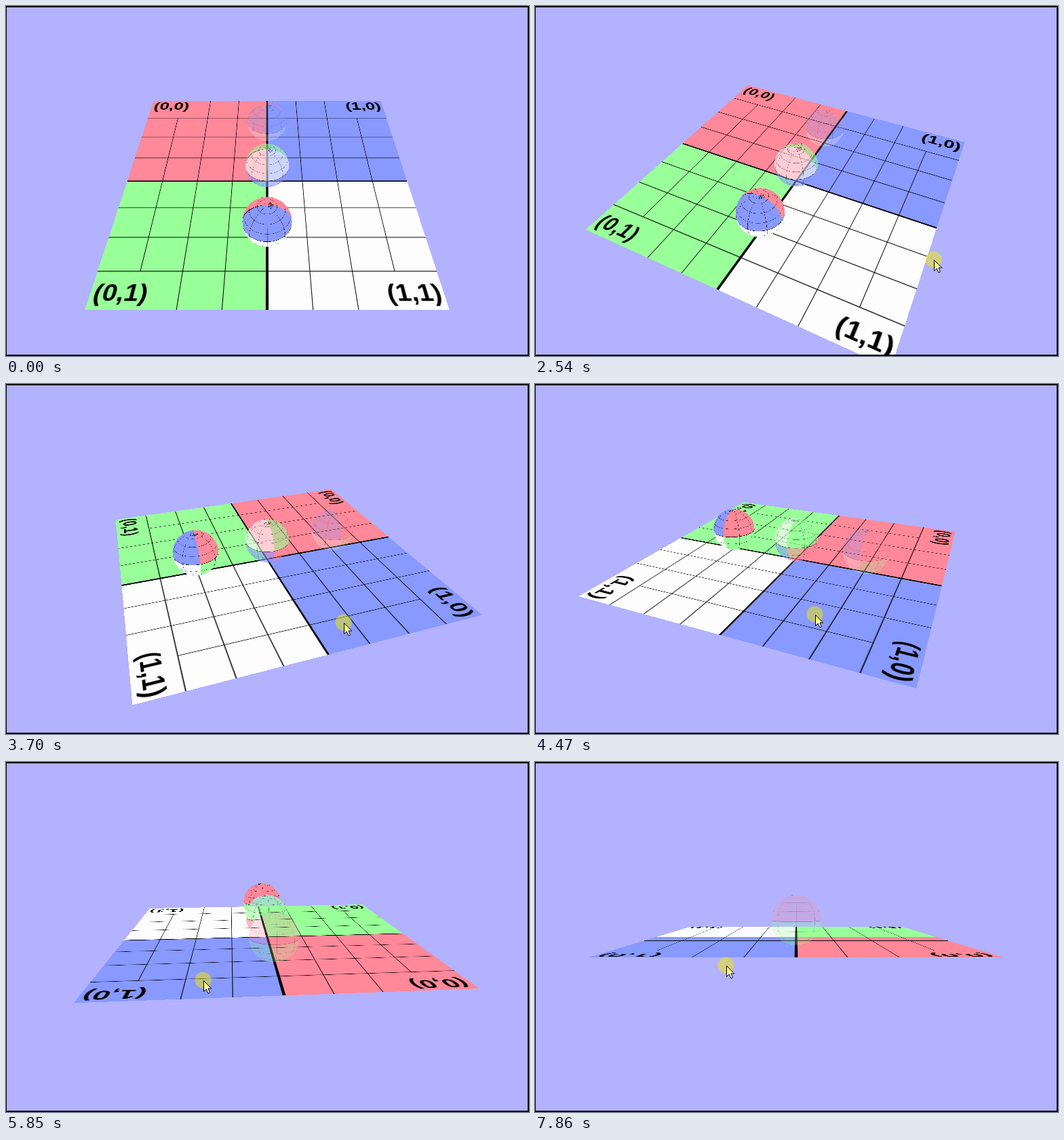
Recreate the animation shown at these times as an HTML page with a canvas. Size 771 by 516 pixels, loop 8000 ms.

```html
<!DOCTYPE html>
<html lang="en">
<head>
<meta charset="utf-8">
<title>Texture coordinates</title>
<style>
html, body { margin: 0; width: 100%; height: 100%; overflow: hidden; background: #b2b2ff; }
canvas { display: block; }
</style>
</head>
<body>
<canvas id="stage" width="771" height="516"></canvas>
<script>
const W = 771, H = 516, LOOP = 8000, RATE = 13 / 1000;
const CX = 385, CY = 258, FOCAL = 627, DIST = 3.04, RADIUS = 0.15;
const SIZE = 512, CELL = SIZE / 8, BACK = [178, 178, 255];
const ctx = document.getElementById('stage').getContext('2d');
const image = ctx.createImageData(W, H);
const pixels = image.data;
const texels = makeTexture();

// Spheres rest on the plane, from the far one to the near one.
const spheres = [
  { z: -0.5, alpha: 0.25, flip: false },
  { z: 0, alpha: 0.6, flip: true },
  { z: 0.5, alpha: 1, flip: false }
];

// Pointer path: time, x, y. Dragging turns the camera, which lags a little.
const PRESS = 1530, ENTER = 70, LAG = 20;
const path = [
  [70, 735, 505], [150, 710, 499], [240, 710, 499], [310, 680, 478], [460, 615, 415],
  [540, 588, 385], [690, 612, 362], [770, 624, 356], [930, 624, 356], [1150, 642, 380],
  [1775, 642, 380], [2000, 630, 379], [2540, 588, 374], [3390, 528, 365], [3700, 497, 352],
  [4240, 440, 343], [5080, 338, 330], [5230, 321, 327], [5500, 303, 324], [5930, 288, 322],
  [6080, 284.5, 320.5], [6230, 284.5, 320.5], [6390, 283, 319], [6780, 283, 319],
  [7550, 282, 303], [7860, 282, 300], [LOOP, 282, 300]
];

function makeTexture() {
  const c = document.createElement('canvas');
  c.width = c.height = SIZE;
  const g = c.getContext('2d');
  const half = SIZE / 2;
  ['#ff8899', '#8899ff', '#99ff99', '#fdfdfd'].forEach((color, i) => {
    g.fillStyle = color;
    g.fillRect(i % 2 * half, (i >> 1) * half, half, half);
  });
  g.fillStyle = '#000';
  for (let i = 1; i < 8; i++) {
    const end = i === 1 || i === 7 ? CELL : 0;
    g.fillRect(i * CELL, end, 1, SIZE - 2 * end);
    g.fillRect(0, i * CELL, SIZE, 1.4);
  }
  g.fillRect(half - 2, 0, 4, SIZE);
  g.fillRect(0, half - 1, SIZE, 3);
  g.font = 'bold 38px "Liberation Sans", Arial, sans-serif';
  for (const x of [0, 1]) {
    g.textAlign = x ? 'right' : 'left';
    for (const y of [0, 1]) g.fillText(`(${x},${y})`, x ? 508 : 5, y ? 498 : 34);
  }
  return g.getImageData(0, 0, SIZE, SIZE).data;
}

// Bilinear lookup, mixed into rgb with the given opacity.
function blend(rgb, u, v, alpha) {
  const max = SIZE - 1;
  const x = Math.min(max, Math.max(0, u * SIZE - 0.5));
  const y = Math.min(max, Math.max(0, v * SIZE - 0.5));
  const x0 = x | 0, y0 = y | 0, fx = x - x0, fy = y - y0;
  const right = x0 < max ? 4 : 0, down = y0 < max ? SIZE * 4 : 0;
  const p = (y0 * SIZE + x0) * 4;
  for (let c = 0; c < 3; c++) {
    const q = p + c;
    const top = texels[q] + (texels[q + right] - texels[q]) * fx;
    const low = texels[q + down] + (texels[q + down + right] - texels[q + down]) * fx;
    rgb[c] += (top + (low - top) * fy - rgb[c]) * alpha;
  }
}

function render(azimuth, elevation) {
  const sa = Math.sin(azimuth), ca = Math.cos(azimuth);
  const se = Math.sin(elevation), ce = Math.cos(elevation);
  const nx = sa * ce, nz = ca * ce;
  const ox = DIST * nx, oy = DIST * se, oz = DIST * nz;
  const rgb = [0, 0, 0];
  for (let py = 0; py < H; py++) {
    const Y = (CY - py - 0.5) / FOCAL;
    const dy = Y * ce - se;
    for (let px = 0; px < W; px++) {
      const X = (px + 0.5 - CX) / FOCAL;
      const dx = X * ca - Y * sa * se - nx;
      const dz = -X * sa - Y * ca * se - nz;
      rgb[0] = BACK[0]; rgb[1] = BACK[1]; rgb[2] = BACK[2];

      if (dy < 0) {
        const s = -oy / dy, x = ox + s * dx, z = oz + s * dz;
        if (x > -1 && x < 1 && z > -1 && z < 1) blend(rgb, (x + 1) / 2, (z + 1) / 2, 1);
      }

      // Only the nearest sphere is drawn, even when it is translucent.
      const a = dx * dx + dy * dy + dz * dz, ey = oy - RADIUS;
      let near = Infinity, hit = null;
      for (const ball of spheres) {
        const ez = oz - ball.z;
        const b = ox * dx + ey * dy + ez * dz;
        const k = b * b - a * (ox * ox + ey * ey + ez * ez - RADIUS * RADIUS);
        if (k < 0) continue;
        const s = (-b - Math.sqrt(k)) / a;
        if (s < near) { near = s; hit = ball; }
      }
      if (hit) {
        const x = ox + near * dx, y = (ey + near * dy) / RADIUS, z = oz + near * dz - hit.z;
        const u = 0.75 + Math.atan2(x, z) / (2 * Math.PI);
        const v = Math.acos(Math.max(-1, Math.min(1, y))) / Math.PI;
        blend(rgb, u % 1, hit.flip ? 1 - v : v, hit.alpha);
      }

      const i = (py * W + px) * 4;
      pixels[i] = rgb[0];
      pixels[i + 1] = rgb[1];
      pixels[i + 2] = rgb[2];
      pixels[i + 3] = 255;
    }
  }
}

function pointerAt(t) {
  const i = path.findIndex(p => p[0] > t);
  if (i < 1) return path[i ? path.length - 1 : 0].slice(1);
  const [t0, x0, y0] = path[i - 1], [t1, x1, y1] = path[i];
  const k = (t - t0) / (t1 - t0);
  return [x0 + (x1 - x0) * k, y0 + (y1 - y0) * k];
}

// Half a degree per dragged pixel.
function cameraAt(t) {
  if (t < PRESS) return [0, 45];
  const [x, y] = pointerAt(t - LAG);
  return [(642 - x) / 2, Math.min(45, 45 - (379 - y) / 2)];
}

function drawPointer(x, y, pressed) {
  const arrow = new Path2D('M0 0V16L3.7 12.5L6.5 18.5L9 17.4L6.4 11.5H11.3Z');
  ctx.save();
  ctx.translate(Math.round(x), Math.round(y));
  ctx.fillStyle = '#fff';
  if (pressed) {
    ctx.fillStyle = 'rgba(242,236,0,0.5)';
    ctx.beginPath();
    ctx.arc(-0.5, -0.5, 12, 0, 2 * Math.PI);
    ctx.fill();
    const tint = ctx.createRadialGradient(0, 0, 11.5, 0, 0, 12);
    tint.addColorStop(0, '#ffff78');
    tint.addColorStop(1, '#fff');
    ctx.fillStyle = tint;
  }
  ctx.translate(0.5, 0.5);
  ctx.fill(arrow);
  ctx.stroke(arrow);
  ctx.restore();
}

let pose = '';
function frame(now) {
  const t = now % LOOP;
  const time = Math.floor((t + 10) * RATE) / RATE;
  const camera = cameraAt(time);
  if (camera.join() !== pose) {
    render(...camera.map(deg => deg * Math.PI / 180));
    pose = camera.join();
  }
  ctx.putImageData(image, 0, 0);
  if (t >= ENTER) drawPointer(...pointerAt(time), t >= PRESS);
  ctx.fillStyle = '#000';
  ctx.fillRect(0, 0, W, 2);
  ctx.fillRect(0, H - 2, W, 2);
  ctx.fillRect(0, 0, 1, H);
  ctx.fillRect(W - 2, 0, 2, H);
  requestAnimationFrame(frame);
}
requestAnimationFrame(frame);
</script>
</body>
</html>
```
